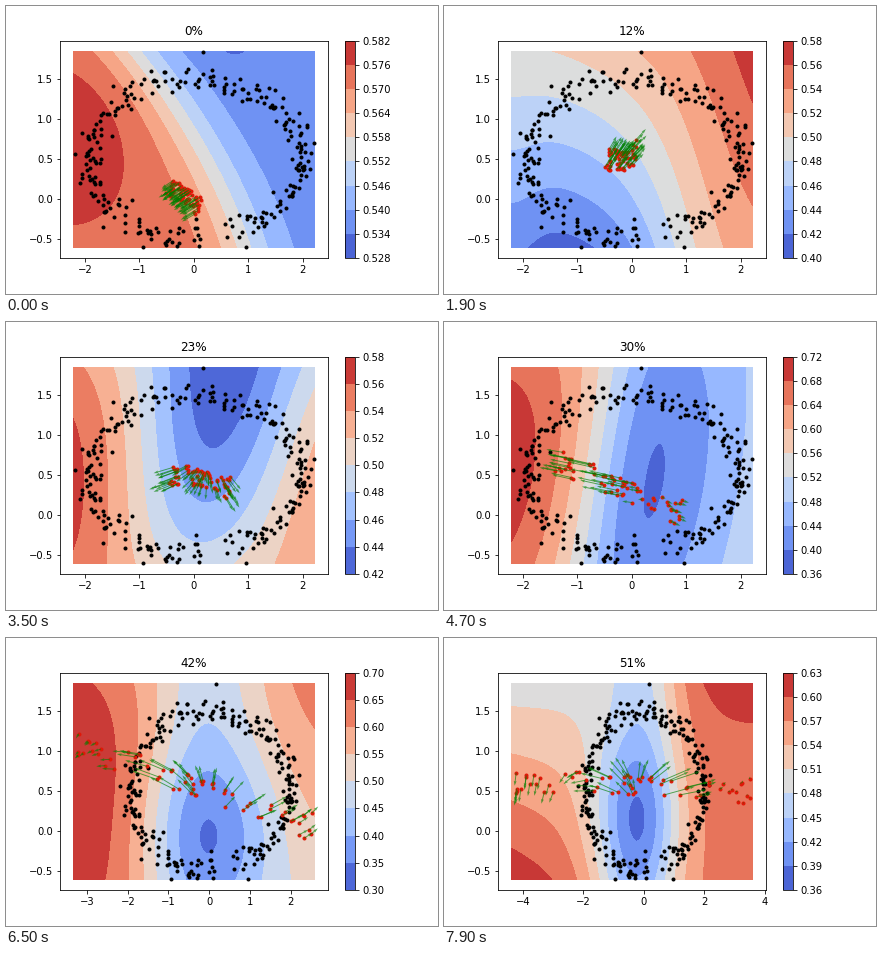
A matplotlib script that plays this animation: 432 px wide and 288 px high, repeating every 8 s.

```python
import numpy as np
import matplotlib.pyplot as plt
from matplotlib.animation import FuncAnimation

plt.rcParams.update({"font.family": "DejaVu Sans", "font.size": 10})

STEPS = 80
KEYS = [0, 10, 19, 35, 47, 65, 79]
YLO, YHI = -0.6, 1.85
PAD = 0.054
rng = np.random.default_rng(4)


def span(step):
    """Horizontal data range, widening as the samples spread out."""
    return (np.interp(step, [56, 65, 79], [-2.22, -3.345, -4.395]),
            np.interp(step, [61, 65, 79], [2.22, 2.595, 3.61]))


# Decision surfaces over the unit square: p runs left to right, q upwards.

def hill(p, q, cp, cq, wp, wq):
    return np.exp(-((p - cp) / wp) ** 2 - ((q - cq) / wq) ** 2)


def valley(p, centre, width, floor, left, right):
    """Gaussian trough between two walls of different height."""
    wall = left + (right - left) * (1 + np.tanh((p - centre) / 0.15)) / 2
    return wall - (wall - floor) * np.exp(-((p - centre) / width) ** 2)


def slanted(p, q):
    c = p - (0.46 - 0.26 * q - 0.2 * q ** 2)
    return (0.5555 - 0.0195 * np.tanh((c - 0.24) / 0.195)
            + 0.005 * hill(p, q, 0, 0.58, 0.25, 0.37)
            - 0.0029 * hill(p, q, 0.655, 1, 0.12, 0.05))


def layered(p, q):
    s = (q - 0.45 * (q - 0.32) * p ** 2
         + 0.15 * (1 - q) * np.exp(-(p / 0.3) ** 2))
    return (0.51 + 0.075 * np.tanh((s - 0.385) / 0.475)
            - 0.012 * hill(p, q, 0.5, 0, 0.3, 0.2))


def corner(p, q):
    bottom = (0.475 + 0.067 * np.tanh((p - 0.66) / 0.27)
              + 0.014 * np.exp(-(p / 0.12) ** 2))
    top = 0.497 + 0.073 * np.abs(p) ** 1.8
    return (1 - q) * bottom + q * top


def funnel(p, q):
    wall = 0.585 - 0.08 * (q - 0.4) ** 2
    floor = 0.492 - 0.12 * q + 0.053 * q ** 2
    return valley(p, 0.52 + 0.1 * q, 0.4, floor, wall, wall - 0.02)


def leaning(p, q):
    return valley(p, 0.54 + 0.12 * q, 0.34, 0.397 + 0.08 * (q - 0.42) ** 2,
                  0.715 - 0.12 * (q - 0.45) ** 2, 0.52)


def arch(p, q):
    floor = 0.345 + 0.13 * (1 - np.exp(-((q - 0.22) / 0.45) ** 2))
    return valley(p, 0.56, 0.29, floor,
                  0.705 - 0.12 * (q - 0.4) ** 2, 0.54 + 0.1 * q)


def pocket(p, q):
    floor = 0.383 + 0.087 * (1 - np.exp(-((q - 0.31) / 0.4) ** 2))
    return valley(p, 0.52, 0.175, floor,
                  0.62 - 0.125 * q - 0.1 * p * (1 - q), 0.585 + 0.03 * q ** 3)


# Each surface with the range it is held to.
FIELDS = [(slanted, 0.5333, 0.5798), (layered, 0.4515, 0.5775),
          (corner, 0.412, 0.57), (funnel, 0.4235, 0.57),
          (leaning, 0.394, 0.709), (arch, 0.335, 0.69),
          (pocket, 0.3805, 0.6165)]


def surface(k, x, y, clip=False):
    f, low, high = FIELDS[k]
    lo, hi = span(KEYS[k])
    z = f((x - lo) / (hi - lo), (y - YLO) / (YHI - YLO))
    return np.clip(z, low, high) if clip else z


# Real samples: a noisy ellipse with a thin spot at the bottom.
ang = np.linspace(0, 2 * np.pi, 265)
rx = 1.98 * np.cos(ang) + rng.normal(0, 0.1, ang.size)
ry = 0.52 + 0.97 * np.sin(ang) + rng.normal(0, 0.1, ang.size)
keep = ~((ry < 0.2) & (rx > 0.15) & (rx < 0.5))
REAL_X = np.r_[np.clip(rx[keep], -2.18, 2.15), 0.17, 2.2]
REAL_Y = np.r_[np.clip(ry[keep], -0.59, 1.66), 1.84, 0.7]

# Generated samples: a curved strand, slightly bunched at ends and middle.
N = 64
line = np.linspace(0, 1, N)
along = line - 0.6 * np.sin(4 * np.pi * line) / (4 * np.pi)
jx, jy = rng.uniform(-1, 1, (2, N))


def strand(start, end, sag, sx, sy):
    (x0, y0), (x1, y1) = start, end
    return (x0 + (x1 - x0) * along + sx * jx,
            y0 + (y1 - y0) * along + sag * 4 * along * (1 - along) + sy * jy)


STRANDS = np.array([
    strand((-0.44, 0.17), (0.09, -0.08), 0.03, 0.09, 0.11),
    strand((-0.49, 0.26), (-0.05, 0.13), 0, 0.05, 0.14),
    strand((-0.45, 0.54), (0.06, 0.59), -0.06, 0.06, 0.16),
    strand((-0.42, 0.52), (0.66, 0.35), 0.05, 0.07, 0.14),
    strand((-1.35, 0.70), (0.90, 0.04), 0, 0.14, 0.15),
    strand((-3.28, 1.12), (2.53, 0.06), 0, 0.12, 0.17),
    strand((-4.30, 0.64), (3.53, 0.50), 0.03, 0.12, 0.16),
])

fig = plt.figure(figsize=(6, 4), dpi=72, facecolor="white")


def draw(i):
    fig.clear()
    fig.subplots_adjust(left=0.125, right=0.9, bottom=0.125, top=0.88)
    ax = fig.add_subplot()
    lo, hi = span(i)
    k = min(np.searchsorted(KEYS, i, side="right") - 1, len(KEYS) - 2)
    t = (i - KEYS[k]) / (KEYS[k + 1] - KEYS[k])

    def blend(x, y, clip=False):
        return (1 - t) * surface(k, x, y, clip) + t * surface(k + 1, x, y, clip)

    gx, gy = np.meshgrid(np.linspace(lo, hi, 90), np.linspace(YLO, YHI, 90))
    cs = ax.contourf(gx, gy, blend(gx, gy, clip=True), cmap="coolwarm")
    fig.colorbar(cs, ax=ax)

    x, y = (1 - t) * STRANDS[k] + t * STRANDS[k + 1]
    x = np.clip(x, lo, hi)
    e = 0.01
    u = blend(x + e, y) - blend(x - e, y)
    v = blend(x, y + e) - blend(x, y - e)

    ax.plot(REAL_X, REAL_Y, ".", color="black", ms=6)
    ax.plot(x, y, ".", color="#e01808", ms=6)
    ax.quiver(x, y, u, v, color="green", alpha=0.65, width=0.0035, zorder=3)

    mx, my = PAD * (hi - lo), PAD * (YHI - YLO)
    ax.set_xlim(lo - mx, hi + mx)
    ax.set_ylim(YLO - my, YHI + my)
    ax.set_title(f"{round(0.645 * i)}%", fontsize=12)
    return []


anim = FuncAnimation(fig, draw, frames=STEPS, interval=100, repeat=True)
plt.show()
```
